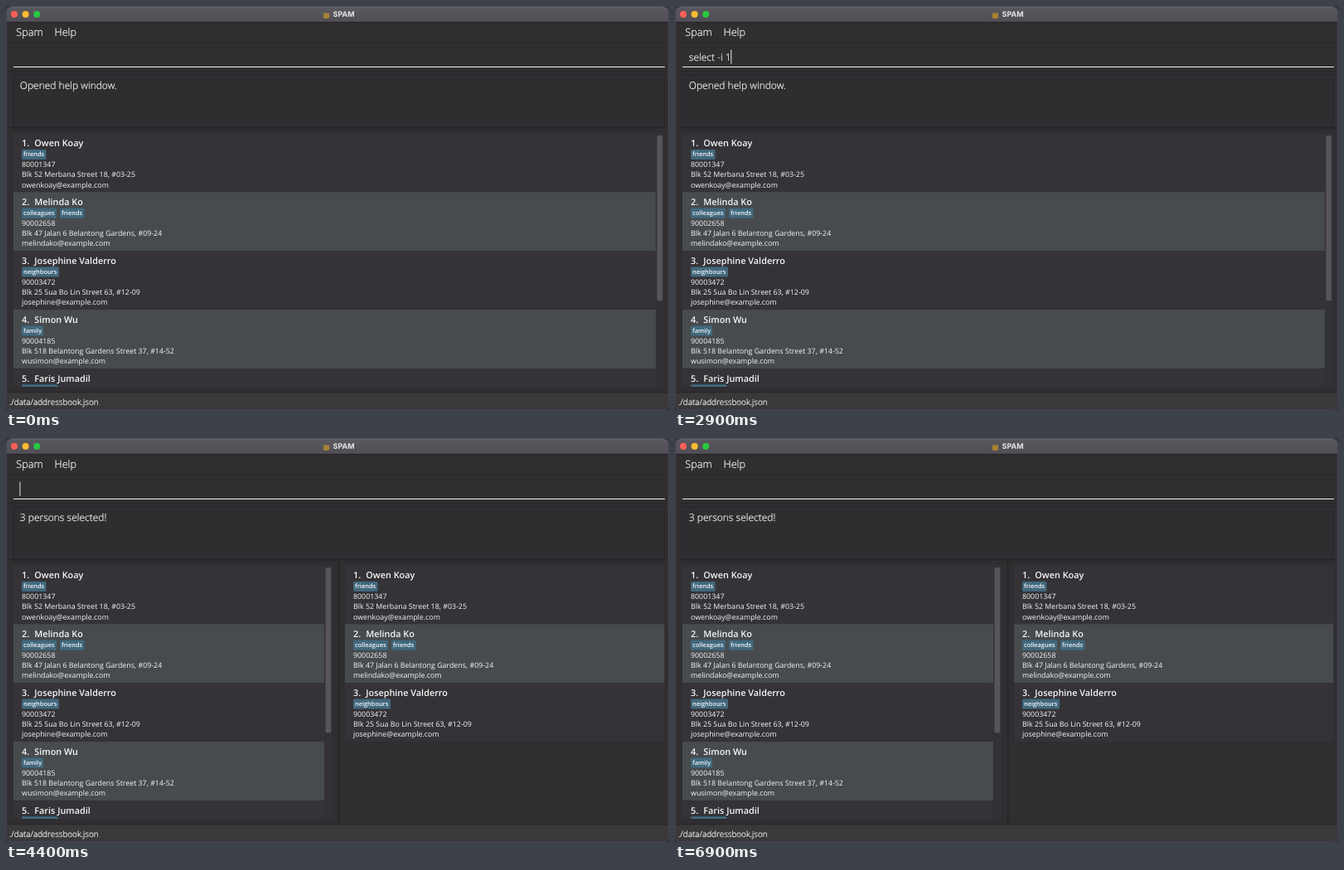
Recreate the animation shown at these times as an HTML page. Size 800x487 px, loop 7100 ms.

```html
<!DOCTYPE html>
<html lang="en">
<head>
<meta charset="utf-8">
<title>Address book</title>
<style>
  html, body { margin: 0; width: 100%; height: 100%; overflow: hidden; background: #343238; }
  svg { display: block; width: 800px; height: 487px; }
  text { font-family: "Open Sans", "Noto Sans", sans-serif; fill: #f6f6f6; white-space: pre; text-rendering: geometricPrecision; }
  .title { font: 700 9px Inter, Roboto, sans-serif; fill: #e6e5e8; }
  .menu, .entry, .status { font-weight: 300; stroke: #f6f6f6; stroke-width: 0.22px; }
  .menu { font-size: 12.7px; }
  .entry { font-size: 12px; }
  .status { font-size: 9.95px; }
  .name { font-size: 10.85px; font-weight: 600; }
  .line { font-size: 8.85px; }
  .tag { font-size: 7.4px; font-weight: 600; }
</style>
</head>
<body>
<svg id="stage" viewBox="0 0 800 487">
  <defs>
    <linearGradient id="bar" x2="0" y2="1">
      <stop offset="0" stop-color="#5b595f"/>
      <stop offset="1" stop-color="#504e55"/>
    </linearGradient>
  </defs>
</svg>
<script>
const LOOP = 7100;
const SELECTED_AT = 4400;
const ROW = 70.85;
const TOP = 153.5;
const TAG_WIDTH = { friends: 29.5, colleagues: 42, neighbours: 45, family: 26, classmates: 43.5 };

const people = [
  ["Owen Koay", ["friends"], "80001347", "Blk 52 Merbana Street 18, #03-25", "owenkoay@example.com"],
  ["Melinda Ko", ["colleagues", "friends"], "90002658", "Blk 47 Jalan 6 Belantong Gardens, #09-24", "melindako@example.com"],
  ["Josephine Valderro", ["neighbours"], "90003472", "Blk 25 Sua Bo Lin Street 63, #12-09", "josephine@example.com"],
  ["Simon Wu", ["family"], "90004185", "Blk 518 Belantong Gardens Street 37, #14-52", "wusimon@example.com"],
  ["Faris Jumadil", ["classmates"]],
];

// Time of each change to the command line: [ms, text, caret visible]
const steps = [
  [0, "", 0], [300, "", 1],
  [700, "s", 1], [800, "se", 1], [900, "sel", 1], [1000, "sele", 1],
  [1100, "selec", 1], [1200, "select", 1],
  [1700, "select ", 1], [1800, "select -", 1], [1900, "select -i", 1],
  [2400, "select -i ", 1], [2900, "select -i 1", 1],
  [3300, "select -i 1 ", 1], [3500, "select -i 1 2", 1],
  [3900, "select -i 1 2 ", 1], [4200, "select -i 1 2 3", 1],
  [4400, "", 1], [4800, "", 0], [5300, "", 1], [5800, "", 0], [6300, "", 1], [6800, "", 0],
];

const stage = document.getElementById("stage");

function add(parent, tag, attrs) {
  const node = document.createElementNS("http://www.w3.org/2000/svg", tag);
  for (const key in attrs) node.setAttribute(key, attrs[key]);
  return parent.appendChild(node);
}
const rect = (parent, x, y, width, height, fill, rx = 0) =>
  add(parent, "rect", { x, y, width, height, fill, rx });
function text(parent, kind, x, y, content) {
  const node = add(parent, "text", { class: kind, x, y });
  node.textContent = content;
  return node;
}

function card(parent, x, index, width) {
  const [name, tags, ...lines] = people[index];
  const y = TOP + index * ROW;
  rect(parent, x, y, width, ROW, index % 2 ? "#474b4d" : "#353337");
  text(parent, "name", x + 10, y + 15.7, index + 1 + ".");
  text(parent, "name", x + 25.3, y + 15.7, name);
  let left = x + 10;
  for (const tag of tags) {
    rect(parent, left, y + 19.4, TAG_WIDTH[tag], 12, "#41697e", 1.5);
    text(parent, "tag", left + 2, y + 27.9, tag);
    left += TAG_WIDTH[tag] + 4;
  }
  lines.forEach((line, i) => text(parent, "line", x + 10, y + 40.7 + i * 12.2, line));
}

function list(parent, x, width, count, scrolls) {
  const id = "clip" + x + "-" + width;
  add(add(stage, "clipPath", { id }), "rect", { x, y: 153, width: width + 12, height: 306 });
  const group = add(parent, "g", { "clip-path": `url(#${id})` });
  if (scrolls) rect(group, x, 153, width + 10, 306, "#333135");
  for (let i = 0; i < count; i++) card(group, x, i, width);
  if (scrolls) rect(group, x + width + 1.5, 156, 6.7, 199.5, "#575559", 2);
}

// Window
rect(stage, 0.5, 0.5, 799, 486.5, "#302e31", 6);
add(stage, "path", { d: "M.5 19.5V7Q.5 1 7 1H793Q799.5 1 799.5 7V19.5Z", fill: "url(#bar)" });
rect(stage, 7, 0.6, 786, 0.8, "#77757b");
rect(stage, 1, 19.2, 798, 1, "#232225");
["#fe5f57", "#febc2e", "#28c840"].forEach((fill, i) =>
  add(stage, "circle", { cx: 10 + i * 13.6, cy: 10, r: 4, fill }));
rect(stage, 383, 8.5, 7, 6.5, "#a5832f", 1);
text(stage, "title", 394.5, 13.3, "SPAM");
text(stage, "menu", 12.3, 36.4, "Spam");
text(stage, "menu", 58.5, 36.4, "Help");

// Command line and result box
rect(stage, 1, 43.3, 798, 1, "#272528");
rect(stage, 9, 73, 786, 1, "#f0f0f0");
rect(stage, 1, 78, 798, 1, "#272528");
add(stage, "rect", { x: 8.5, y: 82.5, width: 786, height: 63, fill: "#2f2d30", stroke: "#28262a" });
rect(stage, 1, 146.3, 798, 1.2, "#252326");
const command = text(stage, "entry", 16.8, 65.6, "");
const caret = rect(stage, 16.4, 52.7, 1, 17, "#e4e4e4");
const result = text(stage, "entry", 16.8, 100.2, "");

// Lists before and after the selection
const before = add(stage, "g");
list(before, 9, 775, 5, true);
const after = add(stage, "g");
list(after, 9, 375, 5, true);
list(after, 409, 385.5, 3, false);
rect(after, 401, 147, 1.2, 318, "#252326");

// Status bar
add(stage, "path", { d: "M.5 466H799.5V481Q799.5 487 793.5 487H6.5Q.5 487 .5 481Z", fill: "#3a383b" });
rect(stage, 1, 465, 798, 1.2, "#252326");
text(stage, "status", 4, 481.3, "./data/addressbook.json");

// Window edge
add(stage, "rect", { x: 0.5, y: 0.5, width: 799, height: 486, rx: 6, fill: "none", stroke: "#4a484d", "stroke-width": 0.8 });

function draw(time) {
  const [, typed, shown] = steps.findLast(step => step[0] <= time);
  const selected = time >= SELECTED_AT;
  command.textContent = typed;
  caret.setAttribute("x", 16.4 + (typed ? command.getComputedTextLength() : 0));
  caret.style.display = shown ? "" : "none";
  result.textContent = selected ? "3 persons selected!" : "Opened help window.";
  before.style.display = selected ? "none" : "";
  after.style.display = selected ? "" : "none";
}

const start = performance.now();
function tick() {
  draw((performance.now() - start) % LOOP);
  requestAnimationFrame(tick);
}
tick();
</script>
</body>
</html>
```
